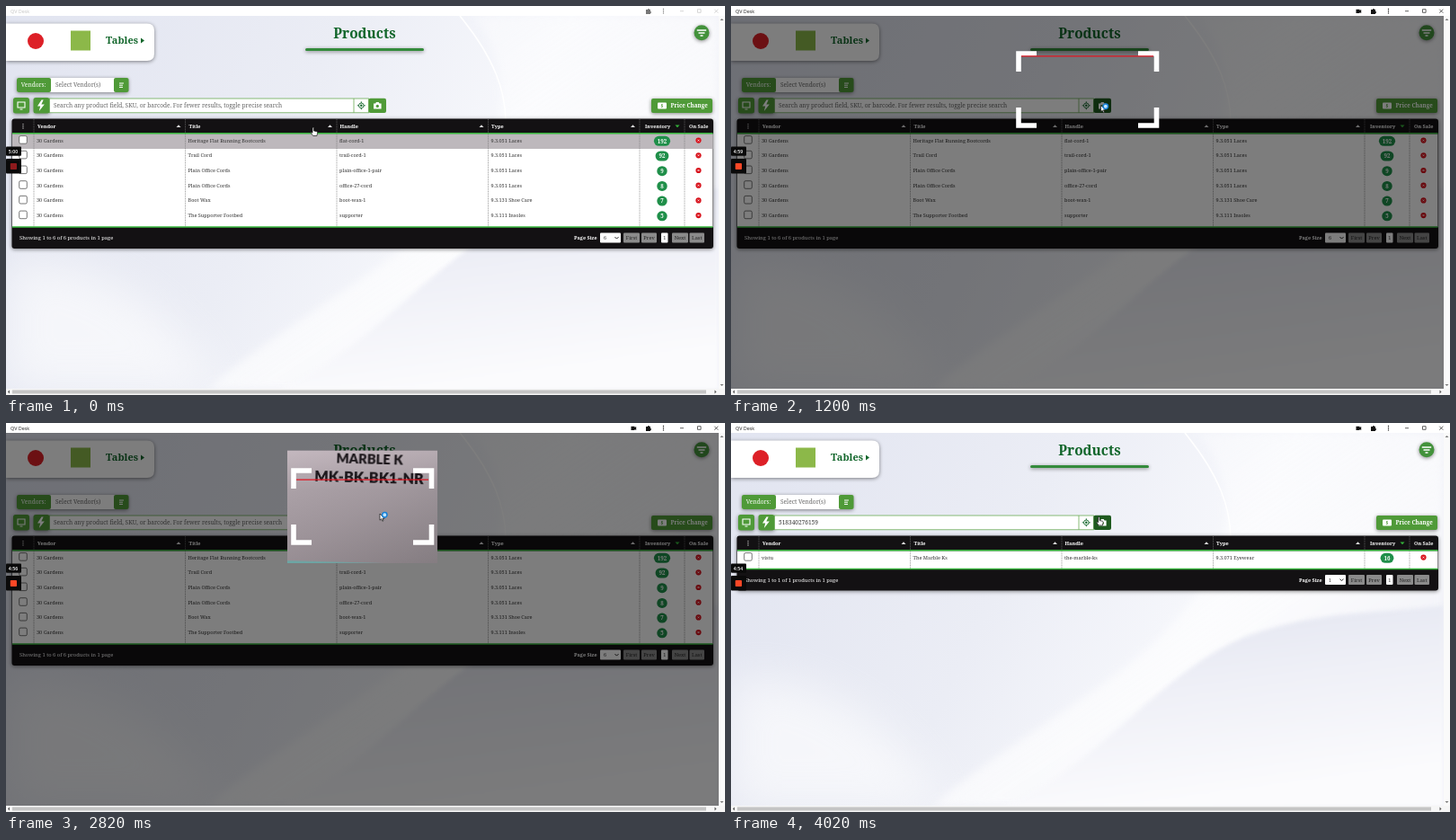
Recreate the animation shown at these times as an HTML page. Size 800x433 px, loop 4080 ms.

```html
<!DOCTYPE html>
<html lang="en">
<head>
<meta charset="utf-8">
<title>Products</title>
<style>
html, body { margin: 0; width: 100%; height: 100%; overflow: hidden; background: #fff; }
svg { display: block; width: 800px; height: 433px; }
text { font-family: "Noto Serif", serif; white-space: pre; }
.sans { font-family: "Open Sans", sans-serif; }
.label { font-family: Lato, sans-serif; font-weight: 900; text-anchor: middle; }
.b { font-weight: 600; }
.mid { text-anchor: middle; }
.soft { filter: drop-shadow(0 1px 2px #0007); }
</style>
</head>
<body>
<svg id="stage" viewBox="0 0 800 433"></svg>
<script>
const LOOP = 4080, STEP = 60;
const GREEN = '#4f9a38', DARK = '#12662b';

// Markup helpers
const rect = (x, y, w, h, fill, r = 0, more = '') =>
  `<rect x="${x}" y="${y}" width="${w}" height="${h}" rx="${r}" fill="${fill}" ${more}/>`;
const text = (x, y, size, fill, str, cls = '', more = '') =>
  `<text x="${x}" y="${y}" font-size="${size}" fill="${fill}" class="${cls}" ${more}>${str}</text>`;
const path = (d, fill, more = '') => `<path d="${d}" fill="${fill}" ${more}/>`;
const line = (d, color, w = 1, more = '') =>
  path(d, 'none', `stroke="${color}" stroke-width="${w}" ${more}`);
const dot = (x, y, r, fill, more = '') => `<circle cx="${x}" cy="${y}" r="${r}" fill="${fill}" ${more}/>`;
const group = (id, body, more = '') => `<g id="${id}" ${more}>${body}</g>`;

const stops = list => list.map(([o, c, a = 1]) =>
  `<stop offset="${o}" stop-color="${c}" stop-opacity="${a}"/>`).join('');
const gradient = (id, x2, y2, list) =>
  `<linearGradient id="${id}" x1="0" y1="0" x2="${x2}" y2="${y2}">${stops(list)}</linearGradient>`;

const defs = `<defs>
  ${gradient('haze', 1, .25, [[0, '#e1e4f0'], [.45, '#ebedf5'], [.75, '#f7f8fc'], [1, '#eff0f7']])}
  ${gradient('wave', .3, 1, [[0, '#e0e3ef'], [.5, '#eff0f7'], [1, '#fbfbfd']])}
  ${gradient('beam', .9, 1, [[0, '#ffffff', .2], [.6, '#ffffff'], [1, '#eceef6']])}
  ${gradient('paper', 1, 1, [[0, '#a897a3'], [.5, '#7b6e78'], [1, '#3d363c']])}
  ${gradient('sheet', 0, 1, [[0, '#d0c6cb'], [.35, '#b3abaf'], [1, '#a39b9f']])}
  <clipPath id="lens">${rect(313, 30.5, 167, 125.5, '#000')}</clipPath>
</defs>`;

const backdrop = rect(0, 11, 793, 415, 'url(#haze)') +
  path('M0 285 C100 275 190 340 235 427 H0Z', '#fff', 'opacity=".6" style="filter:blur(24px)"') +
  path('M520 11 C580 90 560 190 400 300 C320 355 250 400 225 427 H793 V11Z', 'url(#beam)',
    'opacity=".65" style="filter:blur(5px)"') +
  path('M300 427 C410 385 480 270 580 235 C660 207 730 212 793 203 V427Z', 'url(#wave)',
    'style="filter:blur(2px)"') +
  line('M505 11 C545 60 555 95 556 126', '#fff', 1.5);

const titleBar = (id, ink, icon) => group(id,
  text(5, 7.8, 5.4, ink, 'QV Desk', 'sans') +
  path('M712 4h2a1 1 0 0 1 2 0h1v2a1 1 0 0 1 0 2v1h-5z', icon) +
  [3.5, 5.7, 7.9].map(y => dot(731.5, y, .7, icon)).join('') +
  line('M750 5.7h4M769.5 3.7h3.6v3.6h-3.6zM788.3 3.7l4 4m0-4l-4 4', ink, .7));

const scrollbars =
  rect(793, 11, 7, 415, '#fafafa') + rect(0, 426, 800, 7, '#f6f6f6') +
  rect(7, 427.5, 772, 4, '#c4c4c4') +
  path('M4 427.5v4l-2-2zM788.5 427.5v4l2-2z', '#555') +
  path('M794.5 16h4l-2-2zM794.5 421h4l-2 2z', '#777');

const header =
  path('M0 19.5H157Q165 19.5 165 27.5V53Q165 61 157 61H0Z', '#fff', 'class="soft"') +
  dot(33, 39, 9, '#dd2027') + rect(72, 27.5, 22, 22, '#8cb849') +
  text(111, 42.3, 11, DARK, 'Tables', 'b') + path('M150 35.5v6l4-3z', DARK) +
  text(399, 36, 15.4, DARK, 'Products', 'b mid') +
  rect(333, 47, 132, 3, '#348b3c', 1.5, 'class="soft"') +
  dot(774, 29.8, 8.5, '#43923b', 'class="soft"') +
  line('M768.8 27h10.4M770.5 30h7M772.5 33h3', '#fff', 1.3);

const toolbar =
  rect(12, 80, 124, 16, '#fff', 2, 'class="soft"') +
  rect(12, 80, 38, 16, GREEN, 2) + rect(120, 80, 16.5, 16, GREEN, 2) +
  text(16.8, 90.3, 6.6, '#fff', 'Vendors:') + text(55, 90.3, 6.6, '#666', 'Select Vendor(s)') +
  line('M126 86h5M126 88.2h4M126 90.4h4', '#fff', 1) +
  rect(8, 102, 18, 17.5, GREEN, 2.5, 'class="soft"') +
  line('M13 107h8v6h-8zM15.5 115h3', '#fff', 1.1) +
  rect(30.5, 102, 18, 17.5, GREEN, 2.5, 'class="soft"') +
  path('M39.5 104.5l-4.5 7h3.2l-1.4 5.5 6-7.5h-3.5l2.4-5z', '#fff') +
  rect(48.5, 103, 355, 15.8, '#fff', 0, 'stroke="#6aaa55" stroke-width=".8"') +
  line('M387 103v15.8', '#6aaa55', .8) +
  line('M395.3 106.3v9M390.8 110.8h9', DARK, .9) +
  dot(395.3, 110.8, 2.8, '#fff', `stroke="${DARK}" stroke-width=".9"`) + dot(395.3, 110.8, 1.2, DARK) +
  rect(403.5, 102.7, 19.5, 16.4, GREEN, 2, 'id="snap"') +
  path('M409 108.5h2l1-1.4h2.6l1 1.4h2v6h-8.6z', '#fff') + dot(413.3, 111.4, 1.6, GREEN) +
  text(53, 113, 6.55, '#666', '', '', 'id="query"') +
  rect(718, 103, 68, 16, GREEN, 2, 'class="soft"') + rect(725, 107.5, 10, 7, '#fff', 1) +
  text(730, 113, 5, GREEN, '$', 'b mid') + text(739.5, 113, 6.25, '#fff', 'Price Change', 'b');

// Table
const ROW = 16.7, TOP = 142.3, EDGES = [31, 199.5, 368, 536.5, 705, 755];
const heads = [[35, 'Vendor'], [203.5, 'Title'], [371.5, 'Handle'], [540, 'Type'], [711, 'Inventory'], [760, 'On Sale']];
const brand = '30 Gardens', laces = '9.3.051 Laces';
const stock = [
  [brand, 'Heritage Flat Running Bootcords', 'flat-cord-1', laces, 192],
  [brand, 'Trail Cord', 'trail-cord-1', laces, 92],
  [brand, 'Plain Office Cords', 'plain-office-1-pair', laces, 9],
  [brand, 'Plain Office Cords', 'office-27-cord', laces, 8],
  [brand, 'Boot Wax', 'boot-wax-1', '9.3.131 Shoe Care', 7],
  [brand, 'The Supporter Footbed', 'supporter', '9.3.111 Insoles', 5]];
const found = [['vistu', 'The Marble Ks', 'the-marble-ks', '9.3.071 Eyewear', 16]];

function tableRow(cells, i) {
  const y = TOP + 7.3 + i * ROW, count = cells[4], w = 8 + 3.4 * String(count).length;
  return rect(14.7, y - 5, 8.6, 8.6, '#fff', 1.5, 'stroke="#555" stroke-width=".8"') +
    [34, 202.5, 371, 539.5].map((x, k) => text(x, y + 1.9, 5.55, '#333', cells[k])).join('') +
    rect(730 - w / 2, y - 4.8, w, 11, '#1f8f49', 5.5) +
    text(730, y + 3, 6.2, '#fff', count, 'b mid') +
    dot(770.5, y, 3.1, '#d8121c') + line(`M769.5 ${y - 1}l2 2m0 -2l-2 2`, '#fff', .7);
}

function table(id, rows) {
  const n = rows.length, end = TOP + n * ROW + 3.6, y = end + 12;
  const button = (x, w, label) => rect(x, y - 5.5, w, 11, '#8b8b8b', 1) +
    text(x + w / 2, y + 2, 5.7, '#222', label, 'mid');
  return group(id,
    rect(6.5, 125.5, 780.5, end - 101.7, '#131113', 3, 'class="soft"') +
    rect(7, TOP, 779.5, end - TOP, '#fff') +
    (n > 1 ? rect(7, TOP, 779.5, ROW, '#bdb8bc', 0, 'id="hover"') : '') +
    line(EDGES.map(x => `M${x} 126V${end}`).join(''), '#777', .6, 'stroke-dasharray="1 .6"') +
    line(`M7 ${TOP - .6}H786.5M7 ${end}H786.5`, '#35b43a', 1.5) +
    [131.5, 133.7, 135.9].map(v => dot(19, v, .6, '#fff')).join('') +
    heads.map(([x, s]) => text(x, 136, 5.6, '#fff', s, 'b')).join('') +
    [192, 360.5, 529, 697.5].map(x => path(`M${x - 2.5} 135h5l-2.5-2.8z`, '#ddd')).join('') +
    path('M744.5 132.5h5l-2.5 2.8z', '#35b43a') +
    rows.map(tableRow).join('') +
    text(15, y + 2, 5.8, '#fff', `Showing 1 to ${n} of ${n} products in 1 page`) +
    text(632, y + 2, 5.5, '#fff', 'Page Size', 'b') +
    rect(661, y - 5.5, 23, 11, '#fff', 1) + text(665, y + 2, 5.4, '#333', n) +
    line(`M677.5 ${y - 1}l2 2 2-2`, '#222', 1) +
    button(687, 18, 'First') + button(707, 17, 'Prev') +
    rect(729, y - 5.5, 7.5, 11, '#fff', 1) + text(732.7, y + 2, 5.5, '#333', 1, 'mid') +
    button(741, 18, 'Next') + button(760.5, 16.5, 'Last'));
}

const feed = group('feed',
  rect(313, 30.5, 167, 125.5, 'url(#paper)') +
  rect(313, 30.5, 167, 125.5, 'url(#sheet)', 0, 'id="light"') +
  group('print',
    text(0, -12.5, 12.4, '#1c171b', 'MARBLE K', 'label') +
    text(0, 5, 13.6, '#1c171b', 'MK-BK-BK1-NR', 'label') +
    rect(-140, 80, 280, 11, '#6ba6a4') + rect(-140, 91, 280, 40, '#171b1d')),
  'clip-path="url(#lens)"');

const corners = line('M320 73V53H340M453 53H473.5V73M320 113V133H340M453 133H473.5V113', '#fff', 5.6);
const scanner = group('scanner', rect(0, 11, 793, 415, '#000', 0, 'opacity=".51"') +
  feed + corners + line('M323 0H470', '#e01420', 1.2, 'id="laser"'));

const recorder =
  rect(0, 156.5, 17, 10.3, '#0a0a0a', 1) + rect(0, 170, 17, 16.5, '#0a0a0a', 1) +
  text(8, 163.6, 5.2, '#fff', '', 'sans b mid', 'id="clock"') +
  rect(4.8, 175, 7.2, 7, '#ff4726', .8, 'id="record"');

const ink = 'stroke="#111" stroke-width=".7" stroke-linejoin="round"';
const cursor = group('cursor',
  path('M0 0q1-.9 1.6 .3v3.2l3.4 .8q.8 .3 .6 1.4l-.7 3.3h-4.2l-2.5-3.3q0-1.2 1.8 0z', '#fff', `id="hand" ${ink}`) +
  path('M0 0v7.2l1.7-1.5 1.1 2.5 1.2-.5-1.1-2.4h2.2z', '#fff', `id="arrow" ${ink}`) +
  dot(5.3, 1.2, 2.7, '#bfe4ff', 'id="busy" stroke="#1580d8" stroke-width="1.5"'));

const stage = document.getElementById('stage');
stage.innerHTML = defs + backdrop + header + toolbar + table('all', stock) + table('match', found) +
  scanner + rect(0, 0, 800, 11, '#fff') + titleBar('idle', '#c4c4c4', '#777') +
  titleBar('active', '#222', '#111') + path('M695.5 3.7h4v1.2l1.7-1v4l-1.7-1v1.2h-4z', '#111', 'id="cam"') +
  scrollbars + recorder + cursor;

const $ = id => document.getElementById(id);
const set = (id, name, value) => $(id).setAttribute(name, value);
const show = (id, on) => set(id, 'visibility', on ? 'visible' : 'hidden');

// Smoothly blended keys: [time, ...values]
function at(keys, t) {
  const i = keys.findIndex(k => k[0] > t);
  if (i < 0) return keys[keys.length - 1].slice(1);
  if (!i) return keys[0].slice(1);
  const a = keys[i - 1], b = keys[i], u = (t - a[0]) / (b[0] - a[0]), e = u * u * (3 - 2 * u);
  return a.slice(1).map((v, k) => v + (b[k + 1] - v) * e);
}

const ACTIVE = 660, OPEN = 1140, LIVE = 1740, DONE = 3540;
const SWEEP = 80.5, SPEED = .0907;
const pointer = [[0, 341, 135.5], [420, 410, 109.5], [1080, 411.5, 110.5], [1800, 411.5, 110.5],
  [2280, 416, 101], [2820, 416, 101], [3240, 412.3, 102], [3840, 407.5, 104.5], [4020, 408.5, 105]];
// x, y, scale, tilt, blur, light
const camera = [[1740, 402, 55, 1.85, 1, 1.2, 0], [2280, 404, 57, 1.7, 0, .7, .05],
  [2820, 404, 60.5, 1.19, 1.6, .2, .7], [3240, 405.5, 61, 1, .8, .3, .9]];

function draw(t) {
  const scanning = t >= OPEN && t < DONE, done = t >= DONE;
  show('idle', t < ACTIVE);
  show('active', t >= ACTIVE);
  show('cam', t >= OPEN);
  show('all', !done);
  show('match', done);
  set('hover', 'opacity', t < 120 ? 1 : 0);
  set('scanner', 'display', scanning ? 'inline' : 'none');
  set('feed', 'display', t >= LIVE ? 'inline' : 'none');

  const run = Math.max(0, t - 1162) * SPEED % (2 * SWEEP);
  set('laser', 'transform', `translate(0 ${52.5 + Math.min(run, 2 * SWEEP - run)})`);
  const [x, y, scale, tilt, blur, light] = at(camera, t);
  set('print', 'transform', `translate(${x} ${y}) rotate(${tilt}) scale(${scale})`);
  $('print').style.filter = `blur(${blur}px)`;
  set('light', 'opacity', light);

  const ticks = Math.max(0, Math.floor((t - 380) / 560));
  $('clock').textContent = ticks ? '4:' + (60 - ticks) : '5:00';
  set('record', 'fill', t < 120 ? '#8e1a1c' : '#ff4726');
  $('query').textContent = done ? '518340276159'
    : 'Search any product field, SKU, or barcode. For fewer results, toggle precise search';
  set('query', 'fill', done ? '#333' : '#666');

  const [cx, cy] = at(pointer, t), hand = t < OPEN || t >= 3840;
  set('cursor', 'transform', `translate(${cx} ${cy})`);
  show('hand', hand);
  show('arrow', !hand);
  show('busy', t >= OPEN && t < 3060);
  set('snap', 'fill', (t >= 360 && t < DONE) || t >= 3840 ? '#1f5a1f' : GREEN);
}

const start = performance.now();
function tick() {
  draw(Math.floor((performance.now() - start) % LOOP / STEP) * STEP);
  requestAnimationFrame(tick);
}
tick();
</script>
</body>
</html>
```
